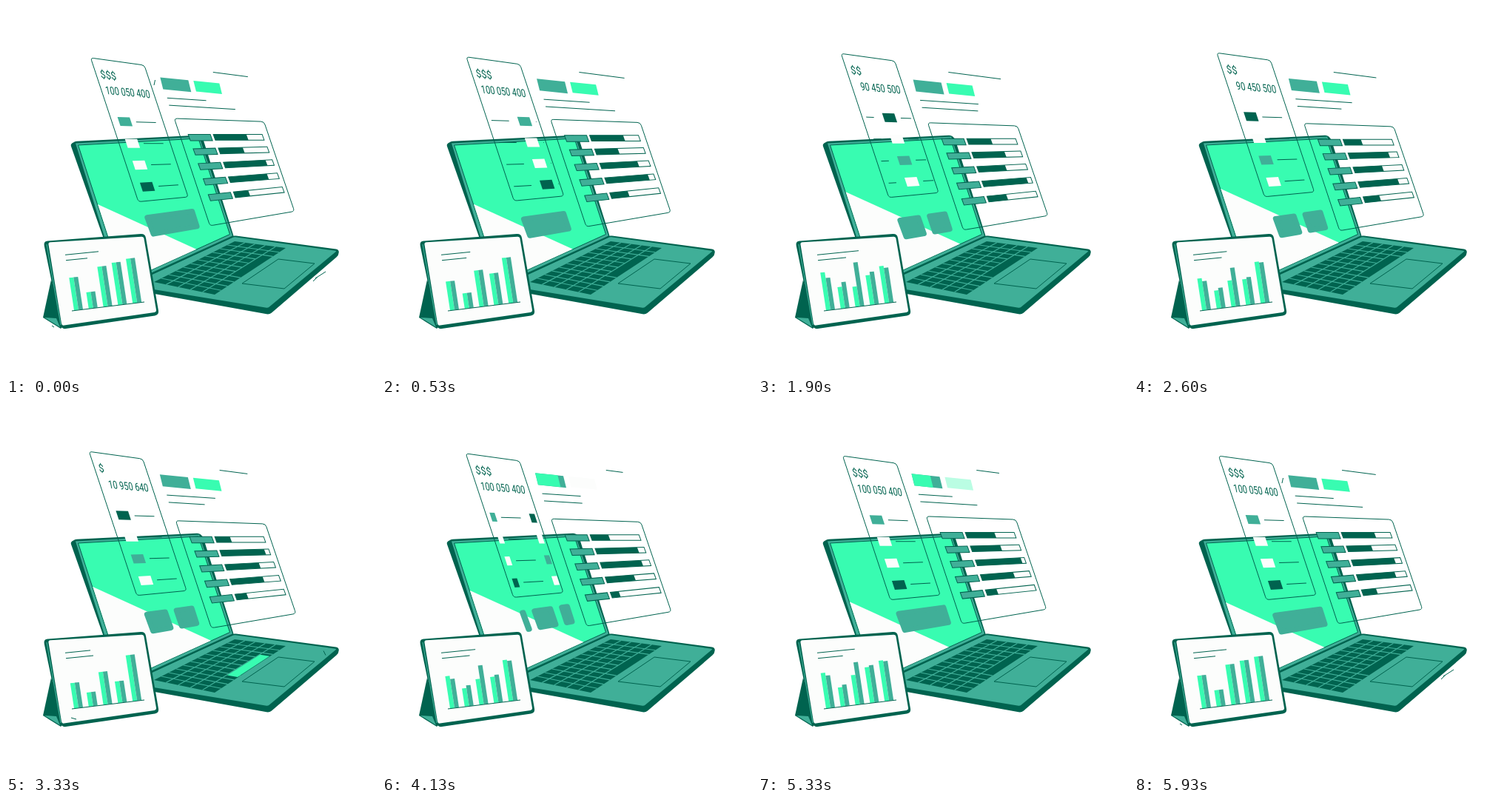
Animation, 500 px wide and 500 px high, one loop 6.01 s. Source, as an HTML page:

```html
<!DOCTYPE html>
<html lang="en">
<head>
<meta charset="utf-8">
<title>Laptop and tablet dashboard</title>
<style>
  html, body { margin: 0; width: 100%; height: 100%; overflow: hidden; background: #fff; }
  svg { display: block; width: 500px; height: 500px; }
  .dark { fill: #00634f; }
  .teal { fill: #40af98; }
  .mint { fill: #38fcb1; }
  .pale { fill: #fcfdfc; }
  .line { fill: none; stroke: #00634f; stroke-width: 1; }
  .edge { stroke: #00634f; stroke-width: 1; }
  .seam { fill: none; stroke: #40af98; stroke-width: 1.2; }
  .round { stroke: #40af98; stroke-width: 7; stroke-linejoin: round; }
  text { font-family: Roboto, "Liberation Sans", sans-serif; fill: #00634f; }
</style>
</head>
<body>
<svg viewBox="0 0 500 500">
  <defs>
    <clipPath id="rowClip"><path d="M-4.2 -2H56.5V15H-4.2Z"/></clipPath>
  </defs>
  <g id="scene"></g>
</svg>
<script>
const NS = 'http://www.w3.org/2000/svg';
const LOOP = 6010;
const STEPS = 120;
const scene = document.getElementById('scene');

function make(tag, cls, attrs = {}, parent = scene) {
  const el = document.createElementNS(NS, tag);
  if (cls) el.setAttribute('class', cls);
  for (const key in attrs) el.setAttribute(key, attrs[key]);
  return parent.appendChild(el);
}
const group = (parent = scene, attrs = {}) => make('g', '', attrs, parent);
const path = (cls, d = '', parent = scene) => make('path', cls, { d }, parent);
const setPath = (el, d) => el.setAttribute('d', d);
const move = (el, x, y) => el.setAttribute('transform', `translate(${x} ${y})`);
const show = (el, on) => el.setAttribute('visibility', on ? 'visible' : 'hidden');
const poly = pts => 'M' + pts.map(p => p.join(' ')).join('L') + 'Z';
const seg = (x1, y1, x2, y2) => `M${x1} ${y1}L${x2} ${y2}`;
const slope = (x, y, length, rise) => seg(x, y, x + length, y + length * rise);
const box = (x1, x2, h) => `M${x1} 0H${x2}V${h}H${x1}Z`;
const mix = (a, b, t) => a + (b - a) * t;
const mixPt = (p, q, t) => [mix(p[0], q[0], t), mix(p[1], q[1], t)];

// motion: a ramp from 0 to 1 and a wave with one cycle per loop
const ramp = (n, from, to) => Math.min(1, Math.max(0, (n - from) / (to - from)));
const cycle = (n, peak) => Math.cos((n - peak) * 2 * Math.PI / STEPS);
const wave = (n, mid, amp, peak) => mid + amp * cycle(n, peak);

// polygon with corners of radius r
function rounded(pts, r) {
  const count = pts.length;
  const toward = (p, q) => mixPt(p, q, r / Math.hypot(q[0] - p[0], q[1] - p[1]));
  return pts.map((p, i) => {
    const a = toward(p, pts[(i + count - 1) % count]);
    const b = toward(p, pts[(i + 1) % count]);
    return `${i ? 'L' : 'M'}${a}Q${p} ${b}`;
  }).join('') + 'Z';
}

// point inside a quad: s along the top edge, t down the sides
const inQuad = (q, s, t) => mixPt(mixPt(q[0], q[1], s), mixPt(q[3], q[2], s), t);
const patch = (q, s1, s2, t1, t2) =>
  poly([inQuad(q, s1, t1), inQuad(q, s2, t1), inQuad(q, s2, t2), inQuad(q, s1, t2)]);

// laptop
path('dark', rounded([[150, 381], [307, 310], [450, 329], [449.5, 337], [356, 417], [190, 387]], 4));
path('teal', rounded([[150, 384], [308, 312], [447, 331], [354, 408], [190, 381.5]], 2));
path('dark', rounded([[87, 187], [93, 183], [261, 174.5], [266, 179], [308, 312], [150, 385], [134, 320]], 3));
path('teal', poly([[94, 185.5], [261, 176.5], [306, 310.5], [154, 380]]));
path('mint edge', poly([[97.5, 188], [260, 179], [302.5, 308.5], [158, 374]]));
const glare = path('pale');
const tileLayer = group();
const tiles = [0, 1, 2].map(() => path('teal round', '', tileLayer));

const KEYS = [[309, 318], [378, 327], [282, 390], [200, 373]];
path('dark', poly(KEYS));
let grid = '';
for (let i = 1; i < 5; i++) grid += seg(...inQuad(KEYS, i / 5, 0), ...inQuad(KEYS, i / 5, 1));
for (let i = 1; i < 11; i++) {
  const end = i > 2 && i < 7 ? 0.8 : 1;
  grid += seg(...inQuad(KEYS, 0, i / 11), ...inQuad(KEYS, end, i / 11));
}
path('seam', grid);
const spaceKey = path('mint', patch(KEYS, 0.81, 0.99, 0.22, 0.67));
path('line', poly([[368, 342], [417, 348], [376, 382], [319, 375]]));

// tablet
path('dark', poly([[61, 370], [50, 421], [74, 436], [80, 430]]));
path('teal', poly([[52, 421], [68, 422], [73, 434]]));
path('dark', rounded([[50.5, 318], [188, 307.5], [207, 417.5], [75, 437]], 6));
path('seam', seg(55, 322, 74, 431));
path('pale', rounded([[57, 319.5], [186, 311.5], [203.5, 413.5], [75.5, 432]], 3));
const notes = path('line');
const bars = [0, 1, 2, 3, 4].map(() => [path('mint'), path('teal')]);
path('line', seg(89, 412, 187, 400));

// chart poses: front bars, back bars, lengths of the two note lines
const pose = (front, back = front, lines) => [...front, ...back, ...lines];
const EVEN = pose([44, 22, 54, 57, 60], undefined, [45, 29]);
const LOW = pose([34, 19, 44, 29, 62], undefined, [34, 37]);
const SPREAD = pose([51, 29, 27, 40, 50], [43, 35, 59, 44, 47], [56, 38]);
const CHART = [[0, EVEN], [21, LOW], [38, SPREAD], [67, LOW], [96, SPREAD], [STEPS - 1, EVEN]];

function barShape(x, h) {
  const y = 411.7 - (x - 89) * 0.122, lean = 0.153 * h;
  return poly([[x, y], [x + 6, y - 0.7], [x + 6 - lean, y - 0.7 - h], [x - lean, y - h]]);
}

// left card
const card = group();
path('line', rounded([[114.5, 70], [187, 80], [246.3, 258], [179, 264.5]], 4), card);
const cash = make('text', '', { transform: 'matrix(.88 .12 .22 1 128.6 97)', 'font-size': 14.5 }, card);
const amount = make('text', '', {
  transform: 'matrix(.72 .065 .2 1 195.6 124.4)', 'font-size': 15, 'text-anchor': 'end'
}, card);
const AMOUNTS = [100050400, 1040500, 90450500, 10950640];
const PITCH = 63;
const SWATCH = { T: 'teal', W: 'pale', D: 'dark' };
const PAGES = ['TWWD', 'WDTT', 'DWTW', 'DWTW'];
const rows = [0, 1, 2, 3].map(i => {
  const tilt = 0.03 - 0.03 * i;
  const row = group(card, { transform: `matrix(1 ${tilt} .33 1 ${150.7 + 10.1 * i} ${150 + 29.6 * i})` });
  const inner = group(row, { 'clip-path': 'url(#rowClip)' });
  return [0, 1].map(() => {
    const item = group(inner);
    const swatch = path('', box(0, 16.5, 12), item);
    path('line', seg(23.3, 6, 50, 6), item);
    return { item, swatch };
  });
});

// right panel
const panel = group();
path('line', rounded([[227.3, 152], [348.5, 156.3], [389.7, 277.5], [275.5, 297]], 4), panel);
const meters = [
  { mid: 0.5, amp: 0.19, peak: 7 },
  { mid: 0.69, amp: 0.22, peak: 70 },
  { mid: 0.75, amp: 0.18, peak: 103 },
  { mid: 0.76, amp: 0.18, peak: 27 },
  { mid: 0.29, amp: 0.12, peak: 28 }
];
meters.forEach((meter, i) => {
  const y = 173.6 + 19 * i + 0.33 * i * i;
  const row = group(panel, { transform: `matrix(1 ${-0.026 * i} .37 1 ${246 + 6.8 * i} ${y})` });
  path('teal edge', box(0, 30, 8.4), row);
  path('pale edge', box(34, 100, 7.6), row);
  meter.fill = path('dark', '', row);
});

// header blocks
const header = group();
const blocks = group(header, { transform: 'matrix(1 .1 .25 1 208 96.2)' });
path('teal', box(0, 38, 16), blocks);
const wipe = path('mint', '', blocks);
path('pale', box(45, 80, 14.5), blocks);
const second = path('mint', box(45, 80, 14.5), blocks);
const headLines = path('line', '', header);

// small accent strokes
const cornerTicks = path('line',
  seg(200, 107, 201.5, 100) + seg(415, 372, 421, 366) + seg(418, 368, 432, 359) +
  seg(60, 402, 62, 398) + seg(62, 432, 65, 434));
const tapTicks = path('line', seg(429, 333.5, 432, 339.5) + seg(88, 424, 95, 426));

function drawTablet(n) {
  const next = CHART.findIndex(([at]) => at > n);
  const [to, target] = CHART.at(next), [from, start] = CHART.at(next < 0 ? -2 : next - 1);
  const now = start.map((v, i) => mix(v, target[i], ramp(n, from, to)));
  bars.forEach((pair, i) => pair.forEach((bar, j) =>
    setPath(bar, barShape(92 + 19.8 * i + 6 * j, now[i + 5 * j]))));
  setPath(notes, slope(80, 336.3, now[10], -0.1) + slope(81, 343.7, now[11], -0.1));
}

function drawScreen(n, sway) {
  // the glare keeps its angle and slides along the screen
  const y = 257.5 + 10.5 * Math.sin(Math.PI / 2 * cycle(n, 0));
  const left = 98 + (y - 188) * 0.325;
  const right = (445.3 - y + 0.455 * left) / 0.908;
  setPath(glare, poly([[left, y], [right, 445.3 - 0.453 * right], [158.5, 373.5]]));

  // two gaps sweep left and split the tile
  const sweep = 78 * ramp(n, 67, 96) ** 2;
  const gap1 = 73 - 37 * ramp(n, 4, 38) - sweep, gap2 = 73 - sweep;
  const quad = [[186, 282.7], [254, 273.7], [262.5, 300.5], [197, 312.3]];
  [[0, gap1 - 4], [gap1 + 4, gap2 - 4], [gap2 + 4, 68]].forEach(([from, to], i) => {
    const a = Math.max(0, from) + 3.5, b = Math.min(68, to) - 3.5;
    setPath(tiles[i], b > a ? patch(quad, a / 68, b / 68, 0.12, 0.88) : '');
  });
  move(tileLayer, 1.2 * sway, 4 * sway);
}

function drawCard(n, lift) {
  move(card, -2.6 * lift, 0.3 - 7 * lift);
  const value = AMOUNTS[Math.min(4, Math.floor((n + 8) / 22)) % 4];
  amount.textContent = String(value).replace(/\B(?=(\d{3})+$)/g, ' ');
  cash.textContent = '$'.repeat(value > 1e8 ? 3 : value > 5e7 ? 2 : 1);
  const pos = 3 * ramp(n, 3.2, 48.5) + ramp(n, 67, 87.5);
  const page = Math.floor(pos), shift = (pos - page) * PITCH;
  rows.forEach((items, i) => items.forEach(({ item, swatch }, j) => {
    move(item, shift - j * PITCH, 0);
    swatch.setAttribute('class', SWATCH[PAGES[(page + j) % 4][i]]);
  }));
}

function drawPanel(n, lift) {
  move(panel, 2.4 * lift, 7 * lift - 0.3);
  for (const { fill, mid, amp, peak } of meters) {
    setPath(fill, box(34, 34 + 66 * wave(n, mid, amp, peak), 7.6));
  }
}

function drawHeader(n, sway) {
  move(header, 0.3 + 1.4 * sway, 0.3 + 3.4 * sway);
  setPath(wipe, box(0, 38 * (ramp(n, 71, 86) - ramp(n, 104, 113)), 16));
  second.setAttribute('opacity', 1 - ramp(n, 69, 80) + ramp(n, 104, 113));
  setPath(headLines,
    slope(326.5, 95.3, -47 - 26 * sway, 0.13) +
    slope(217.5, 124, wave(n, 62, 17, 41), 0.066) +
    slope(220, 133.8, wave(n, 71, 23, 12), 0.062));
}

function draw() {
  const ms = performance.now() % LOOP;
  // steps alternate between 30 ms and 70 ms
  const n = Math.min(STEPS - 1, 2 * Math.floor(ms / 100) + (ms % 100 >= 30 ? 1 : 0));
  const lift = wave(n, 0.5, 0.5, 52.5);
  const sway = cycle(n, 30);
  drawScreen(n, sway);
  drawTablet(n);
  drawCard(n, lift);
  drawPanel(n, lift);
  drawHeader(n, sway);
  show(spaceKey, Math.abs(n - 67) < 7);
  show(tapTicks, Math.abs(n - 67) < 6);
  show(cornerTicks, n > 112 || n < 7);
  requestAnimationFrame(draw);
}
draw();
</script>
</body>
</html>
```
